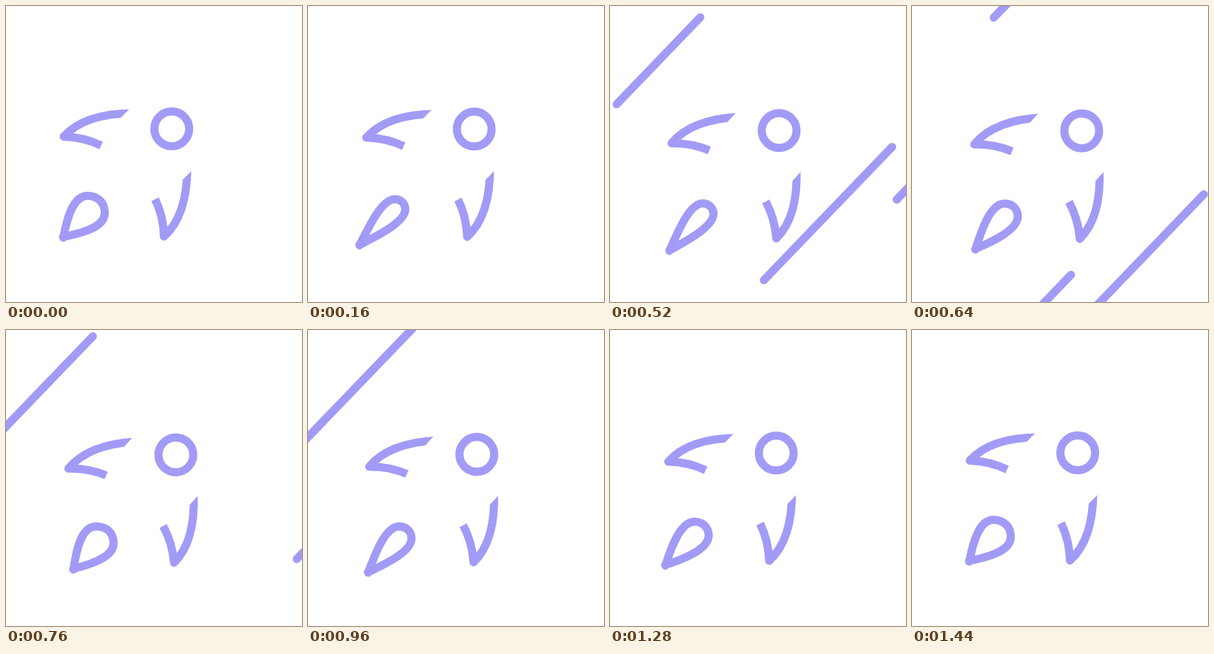
Write an HTML page that moves like this. It is 400 px wide and 400 px high and loops after 1.52 s.

```html
<!DOCTYPE html>
<html>
<head>
<meta charset="utf-8">
<style>
html, body { margin: 0; width: 100%; height: 100%; overflow: hidden; background: #fff; }
svg { display: block; width: 100vw; height: 100vh; }
</style>
</head>
<body>
<svg viewBox="0 0 400 400" fill="none" stroke="#a29bf6" stroke-width="11" stroke-linejoin="round">
  <defs>
    <clipPath id="cut"><path d="M0 0H306L140 166V400H0Z"/></clipPath>
    <path id="fin" clip-path="url(#cut)" d="M172 145C135 145 100 152 78 176.5C96 177 113 181 128.5 188.5"/>
  </defs>
  <g id="streaks" stroke-linecap="round"></g>
  <g id="rocket">
    <circle cx="224" cy="166" r="23.5"/>
    <use href="#fin"/>
    <use href="#fin" transform="matrix(0 -1 -1 0 390 389.5)"/>
    <path id="flame"/>
  </g>
</svg>
<script>
const LOOP = 1520, CYCLE = 1440, FLARE = 740;
const SPEED = 2, STREAK_ANGLE = -46.1;

const byId = id => document.getElementById(id);
const wave = p => (1 - Math.cos(2 * Math.PI * p)) / 2;
const mirror = ([x, y]) => [390 - y, 389.5 - x];

// Each streak crosses the main diagonal at (lane / 2, lane / 2) at its time.
const streaks = [];
function addStreak(time, lane, length = 250) {
  const line = document.createElementNS('http://www.w3.org/2000/svg', 'path');
  line.setAttribute('d', `M${-length / 2} 0h${length}`);
  byId('streaks').append(line);
  streaks.push({ line, time, lane });
}
addStreak(320, 193, 300);
addStreak(320, 762);
addStreak(517, 139.4, 163);
addStreak(525, 575.3);
addStreak(627, 651.5);
addStreak(736, 128);
addStreak(852, 704);
addStreak(960, 142);

// One side of the drop, from tip to top; the other side is its mirror image.
function flamePath(s) {
  const side = [
    [77.5 - 10 * s, 313 + 9.5 * s],
    [82 - 4.5 * s, 289 + 16 * s],
    [90 + 7 * s, 256.5 + 4 * s],
    [110 + 6 * s, 256.5 + 3.5 * s],
    [124, 256.5 + 3.5 * s]
  ];
  const [tip, ...curve] = [...side, ...side.map(mirror).reverse()];
  return `M${tip}C${curve.join(' ')}Z`;
}

function draw(now) {
  const t = Math.min(now % LOOP, CYCLE);
  byId('rocket').setAttribute('transform', `rotate(${-3.2 * wave(t / CYCLE)} 276 68)`);

  // Two quick flares, then a slow one.
  const flare = t < FLARE ? 2 * t / FLARE : (t - FLARE) / (CYCLE - FLARE);
  byId('flame').setAttribute('d', flamePath(wave(flare)));

  for (const { line, time, lane } of streaks) {
    const along = (time - t) * SPEED;
    line.setAttribute('transform',
      `translate(${lane / 2} ${lane / 2}) rotate(${STREAK_ANGLE}) translate(${along})`);
  }
}

let origin;
function tick(now) {
  origin ??= now;
  draw(now - origin);
  requestAnimationFrame(tick);
}
draw(0);
requestAnimationFrame(tick);
</script>
</body>
</html>
```
